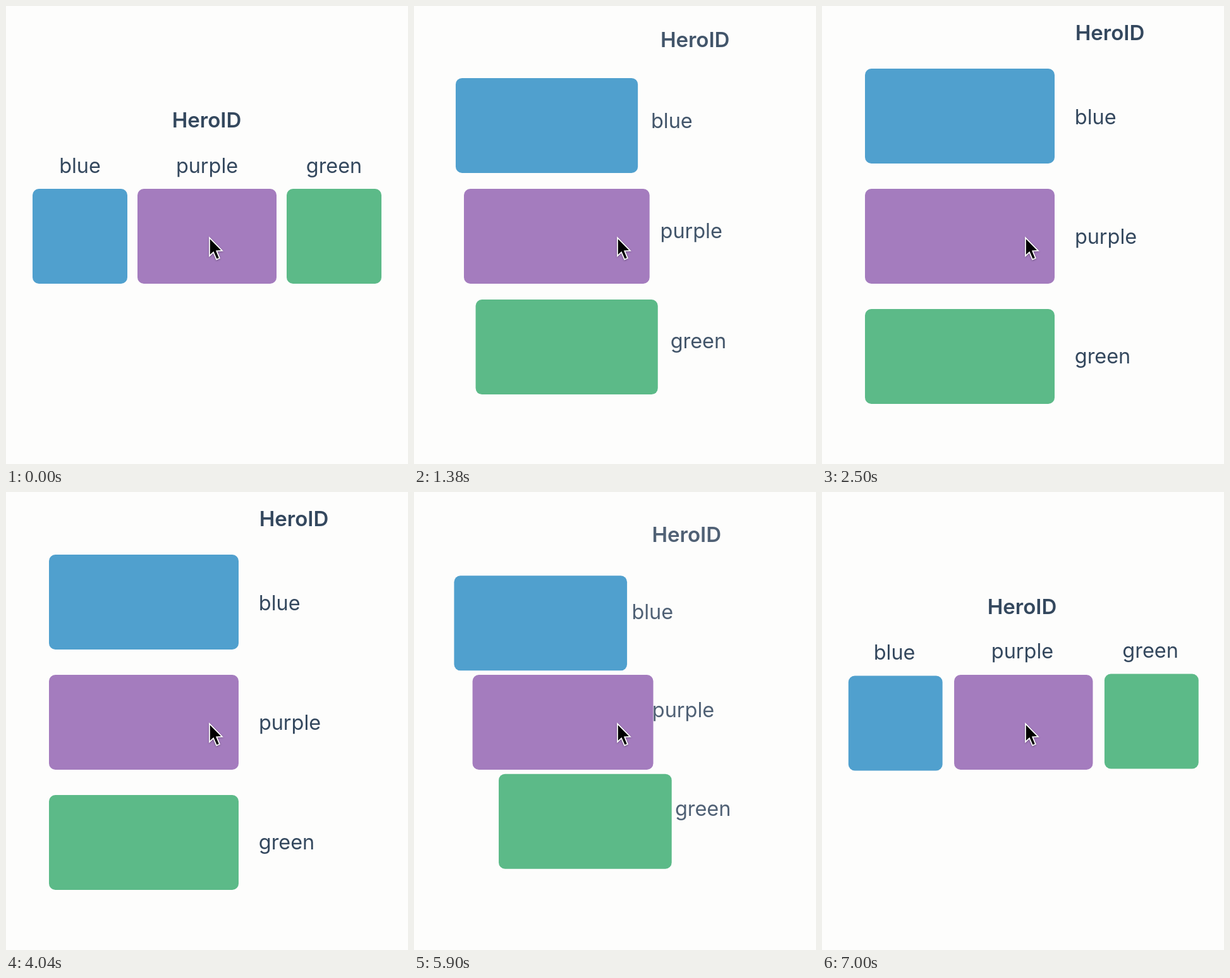
An HTML page with a canvas that plays this animation: 636x724 px, repeating every 7020 ms.

```html
<!DOCTYPE html>
<html lang="en">
<head>
<meta charset="utf-8">
<title>HeroID</title>
<style>
  html, body { margin: 0; width: 636px; height: 724px; overflow: hidden; background: #fdfdfc; }
  canvas { display: block; }
</style>
</head>
<body>
<canvas id="stage" width="636" height="724"></canvas>
<script>
const ctx = document.getElementById('stage').getContext('2d');
const LOOP = 7020;

// Spring constants; times are counted in ticks.
const DAMPING = 0.8, SPEED = 0.2608;
const OPEN = 16.98, CLOSE = 124.24;

// Each pair is [row layout, column layout].
const boxes = [
  { color: '#50a0ce', x: [42, 68], y: [289, 99], w: [150, 300] },
  { color: '#a47cbe', x: [208, 68], y: [289, 289], w: [220, 300], under: 0.33 },
  { color: '#5cba88', x: [444, 68], y: [289, 479], w: [150, 300], under: 0.04 },
];
const labels = [
  { text: 'HeroID', font: '600 33px', x: [317.5, 455.5], y: [191.5, 54.5] },
  { text: 'blue', font: '400 32.4px', x: [117, 432.7], y: [264, 187] },
  { text: 'purple', font: '400 32.4px', x: [318, 449], y: [264, 376] },
  { text: 'green', font: '400 32.4px', x: [519, 444], y: [264, 565] },
];

const mix = ([a, b], p) => a + (b - a) * p;

// Steps are held for 100, 20 and 20 ms in turn.
function tickAt(ms) {
  const s = ms + 120, rest = s % 140;
  return 3 * Math.floor(s / 140) + (rest < 100 ? 0 : rest < 120 ? 1 : 2) - 2;
}

function spring(ticks) {
  if (ticks <= 0) return 0;
  const a = ticks * SPEED, root = Math.sqrt(1 - DAMPING ** 2);
  return 1 - Math.exp(-DAMPING * a) *
    (Math.cos(root * a) + DAMPING / root * Math.sin(root * a));
}

function boxPath(box, p) {
  ctx.beginPath();
  ctx.roundRect(mix(box.x, p), mix(box.y, p), mix(box.w, p), 150, 10);
}

function drawBox(box, i, p) {
  boxPath(box, p);
  ctx.fillStyle = box.color;
  ctx.fill();
  if (!box.under) return;
  // The box below shows through where the two overlap.
  const below = boxes[i - 1];
  ctx.save();
  ctx.clip();
  boxPath(below, p);
  ctx.globalAlpha = box.under;
  ctx.fillStyle = below.color;
  ctx.fill();
  ctx.restore();
}

function drawLabel(label, p) {
  ctx.font = `${label.font} Inter, sans-serif`;
  ctx.fillText(label.text, mix(label.x, p), mix(label.y, p));
}

const arrow = new Path2D('M322.8 368.5V393L328.4 387.7L333.5 399.6L336.8 398.2L331.9 386.4L340 386Z');

function drawCursor() {
  ctx.save();
  ctx.shadowColor = 'rgba(0,0,0,.3)';
  ctx.shadowBlur = 3;
  ctx.shadowOffsetY = 1;
  ctx.strokeStyle = '#fff';
  ctx.lineWidth = 3.4;
  ctx.stroke(arrow);
  ctx.restore();
  ctx.fillStyle = '#000';
  ctx.fill(arrow);
}

function draw(now) {
  const tick = tickAt(now % LOOP);
  const p = spring(tick - OPEN) - spring(tick - CLOSE);
  const fade = Math.max(0, 4 * p * (1 - p));

  ctx.fillStyle = '#fdfdfc';
  ctx.fillRect(0, 0, 636, 724);
  boxes.forEach((box, i) => drawBox(box, i, p));

  ctx.textAlign = 'center';
  ctx.fillStyle = `rgb(${mix([52, 100], fade)},${mix([72, 116], fade)},${mix([94, 134], fade)})`;
  labels.forEach(label => drawLabel(label, p));
  drawCursor();
}

const start = performance.now();
function loop() {
  draw(performance.now() - start);
  requestAnimationFrame(loop);
}
loop();
</script>
</body>
</html>
```
